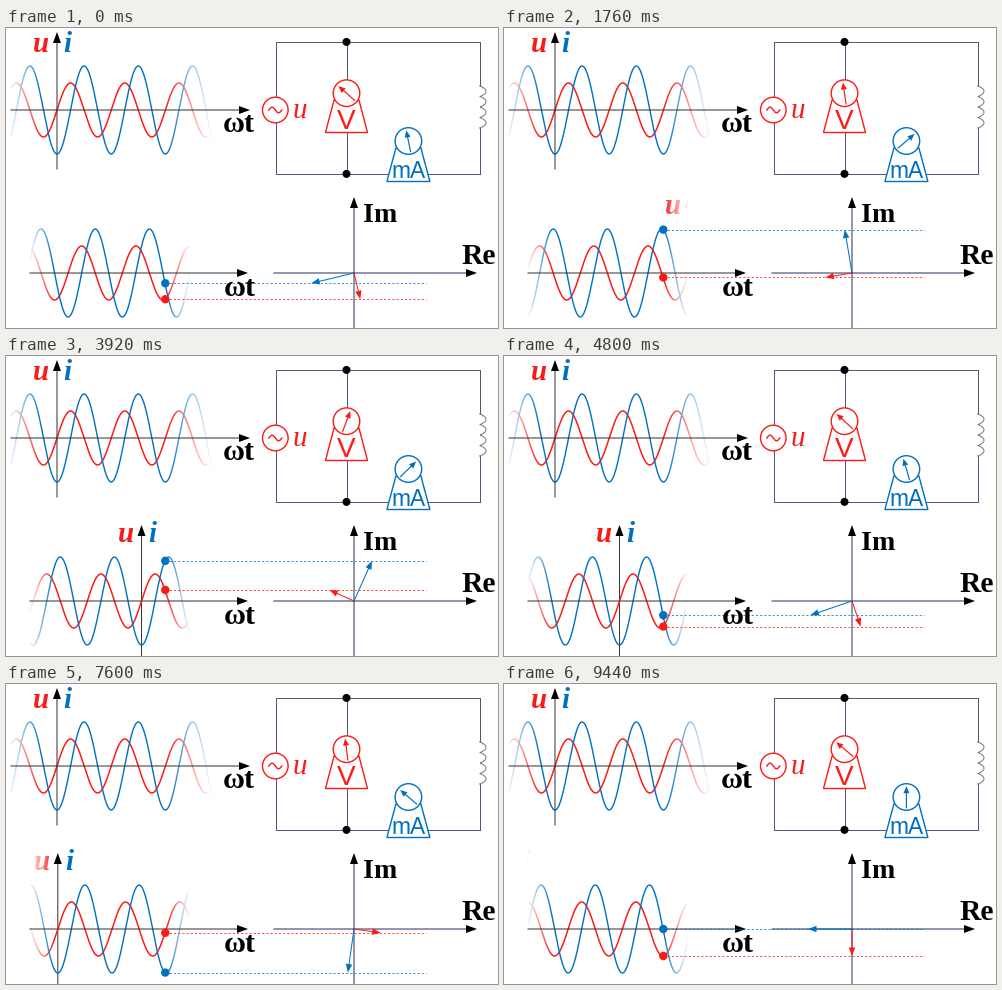
A matplotlib script for the animation above (9.52 s loop, 492 by 300 pixels).

```python
import numpy as np
import matplotlib.pyplot as plt
from matplotlib.animation import FuncAnimation
from matplotlib.patches import Circle, Polygon

W, H = 492, 300
FRAMES, STEP = 119, 80
PX = 0.72  # points per pixel at 100 dpi

RED, BLUE = "#fc1a16", "#0070c0"
INK, GREY, NAVY = "#000000", "#5c5660", "#55558c"
AXIS, PLANE = "#333333", "#26305c"

PERIOD = 54.2
AMP_U, AMP_I = 27, 44
MID_TOP, MID_LOW = 82, 245
AXIS_TOP = 51
PROBE = 159.3
ORIGIN = (348, 245)

fig = plt.figure(figsize=(W / 100, H / 100), dpi=100, facecolor="white")
ax = fig.add_axes([0, 0, 1, 1])


def line(xs, ys, color=INK, width=1.0, z=2, **kw):
    return ax.plot(xs, ys, color=color, lw=width * PX, zorder=z, **kw)[0]


def text(x, y, s, size, color=INK, family="Liberation Serif", weight="bold",
         style="normal", ha="left", z=6):
    return ax.text(x, y, s, fontsize=size * PX, color=color, family=family,
                   weight=weight, style=style, ha=ha, va="baseline", zorder=z)


def disc(x, y, r, face, edge="none", width=0, z=6):
    return ax.add_patch(Circle((x, y), r, fc=face, ec=edge, lw=width * PX, zorder=z))


def head_points(tip, direction, length, half):
    tip, d = np.array(tip, float), np.array(direction, float)
    d /= np.hypot(*d)
    side = np.array([-d[1], d[0]]) * half
    base = tip - d * length
    return np.array([tip, base + side, base - side])


class Arrow:
    def __init__(self, color, width, length, half, z):
        self.shaft = line([0, 1], [0, 0], color, width, z, snap=False)
        self.size = length, half
        self.head = ax.add_patch(Polygon([(0, 0), (1, 0), (1, 1)], fc=color,
                                         ec="none", zorder=z, snap=False))

    def place(self, start, tip):
        d = np.subtract(tip, start)
        end = np.array(tip) - d / np.hypot(*d) * self.size[0] * 0.7
        self.shaft.set_data([start[0], end[0]], [start[1], end[1]])
        self.head.set_xy(head_points(tip, d, *self.size))


def axis_arrow(start, tip, color=AXIS, z=5):
    arrow = Arrow(color, 1, 11, 4, z)
    arrow.head.set_facecolor(INK)
    arrow.place(start, tip)
    return arrow


def fade(x0, x1, y0, y1, left, right):
    """White veil, clear between left[1] and right[0]."""
    xs = np.linspace(x0, x1, 2 * int(x1 - x0))
    veil = np.ones((1, len(xs), 4))
    veil[0, :, 3] = np.interp(xs, [*left, *right], [1, 0, 0, 1])
    ax.imshow(veil, extent=(x0, x1, y1, y0), aspect="auto", zorder=4,
              interpolation="nearest")


def volt(x, zero):
    return np.sin((x - zero) / PERIOD * 2 * np.pi)


def amp(x, zero):
    return -np.cos((x - zero) / PERIOD * 2 * np.pi)


# Upper graph
xt = np.linspace(5, 207, 500)
axis_arrow((5, MID_TOP), (244, MID_TOP))
axis_arrow((AXIS_TOP, 141), (AXIS_TOP, 4))
line(xt, MID_TOP - AMP_U * volt(xt, AXIS_TOP), RED, 1.5, 3)
line(xt, MID_TOP - AMP_I * amp(xt, AXIS_TOP), BLUE, 1.4, 3)
fade(0, 210, 30, 135, (2, 36), (160, 207))
text(27, 23.5, "u", 29, RED, style="italic")
text(57.5, 23.5, "i", 29, BLUE, style="italic")
text(217, 104, "ωt", 30)

# Circuit
LEFT, MIDDLE, RIGHT, TOP, BOTTOM = 269.5, 340.5, 473.5, 13.5, 145.5
line([LEFT, LEFT], [TOP, BOTTOM], NAVY)
line([LEFT, RIGHT], [TOP, TOP], GREY)
line([RIGHT, RIGHT], [TOP, 58], GREY)
line([RIGHT, RIGHT], [100, BOTTOM], NAVY)
line([LEFT, RIGHT], [BOTTOM, BOTTOM], NAVY)
line([MIDDLE, MIDDLE], [TOP, BOTTOM], NAVY)
turn = np.linspace(0, 4 * np.pi, 160)
line(RIGHT + 6.5 * np.abs(np.sin(turn)) ** 0.7, 58 + 42 * turn / (4 * np.pi),
     "#77777f", 1)
for y in (TOP, BOTTOM):
    disc(MIDDLE, y + 0.4, 4, INK)

disc(269.3, 82, 12.8, "white", RED, 1.4, 3)
xs = np.linspace(-6.5, 6.5, 40)
line(269.3 + xs, 82 - 2.8 * np.sin((xs + 6.5) / 13 * 2 * np.pi), RED, 1.4, 6)
text(287, 89.5, "u", 29, RED, weight="normal", style="italic")


def meter(x, y, foot, bottom, color, label, size, base):
    body = [(x - 12.5, y + 7), (x + 12.5, y + 7), (x + foot, bottom), (x - foot, bottom)]
    ax.add_patch(Polygon(body, fc="white", ec=color, lw=1.4 * PX, zorder=4))
    disc(x, y, 13.3, "white", color, 1.4, 5)
    text(x, base, label, size, color, "Liberation Sans", "normal", ha="center")
    return Arrow(color, 1.2, 7, 3, 7)


V_POS, A_POS = (340.5, 65.2), (402.4, 113)
v_needle = meter(*V_POS, 21, 104.5, RED, "V", 28, 101)
a_needle = meter(*A_POS, 21.5, 153.5, BLUE, "mA", 22.8, 150)

# Lower graph
xl = np.linspace(24, 185, 420)
axis_arrow((24, MID_LOW), (242, MID_LOW))
text(218, 268, "ωt", 30)
fade(0, 250, 160, 300, (23, 48), (160, 184.5))
u_wave = line(xl, xl, RED, 1.5, 3)
i_wave = line(xl, xl, BLUE, 1.4, 3)
moving_axis = axis_arrow((200, 300), (200, 169), AXIS, 2)
u_label = text(0, 186.5, "u", 29, RED, style="italic", z=3)
i_label = text(0, 186.5, "i", 29, BLUE, style="italic", z=3)

# Phasor plane
axis_arrow((268, ORIGIN[1]), (471, ORIGIN[1]), PLANE)
axis_arrow((ORIGIN[0], 302), (ORIGIN[0], 169), PLANE)
text(357.5, 193.5, "Im", 28)
text(455, 236.5, "Re", 29.5)

dots = (0, (2.2, 2.0))
u_trace = line([PROBE, 420], [0, 0], RED, 1, 5, ls=dots, alpha=0.75)
i_trace = line([PROBE, 420], [0, 0], BLUE, 1, 5, ls=dots, alpha=0.75)
u_dot = disc(PROBE, 0, 4.2, RED, z=7)
i_dot = disc(PROBE, 0, 4.2, BLUE, z=7)
u_phasor = Arrow(RED, 1, 8.5, 3.2, 7)
i_phasor = Arrow(BLUE, 1, 8.5, 3.2, 7)

ax.set_xlim(0, W)
ax.set_ylim(H, 0)
ax.axis("off")


def swing(needle, center, value):
    a = np.radians(50 * value)
    d = 10.8 * np.array([np.sin(a), -np.cos(a)])
    needle.place(center - d, center + d)


def update(n):
    turns = (-436.5 + 12.089 * n) / 360
    zero = PROBE - 0.3 - turns * PERIOD
    phase = turns * 2 * np.pi
    u, i = np.sin(phase), -np.cos(phase)

    u_wave.set_ydata(MID_LOW - AMP_U * volt(xl, zero))
    i_wave.set_ydata(MID_LOW - AMP_I * amp(xl, zero))
    moving_axis.place((zero, 302), (zero, 169))
    u_label.set_x(zero - 24)
    i_label.set_x(zero + 7)

    yu, yi = MID_LOW - AMP_U * u, MID_LOW - AMP_I * i
    u_trace.set_ydata([yu, yu])
    i_trace.set_ydata([yi, yi])
    u_dot.center = PROBE, yu
    i_dot.center = PROBE, yi

    u_phasor.place(ORIGIN, (ORIGIN[0] + AMP_U * np.cos(phase), yu))
    i_phasor.place(ORIGIN, (ORIGIN[0] + AMP_I * np.sin(phase), yi))
    swing(v_needle, V_POS, u)
    swing(a_needle, A_POS, i)
    return []


anim = FuncAnimation(fig, update, frames=FRAMES, interval=STEP,
                     init_func=lambda: update(0), repeat=True, repeat_delay=0)
plt.show()
```
